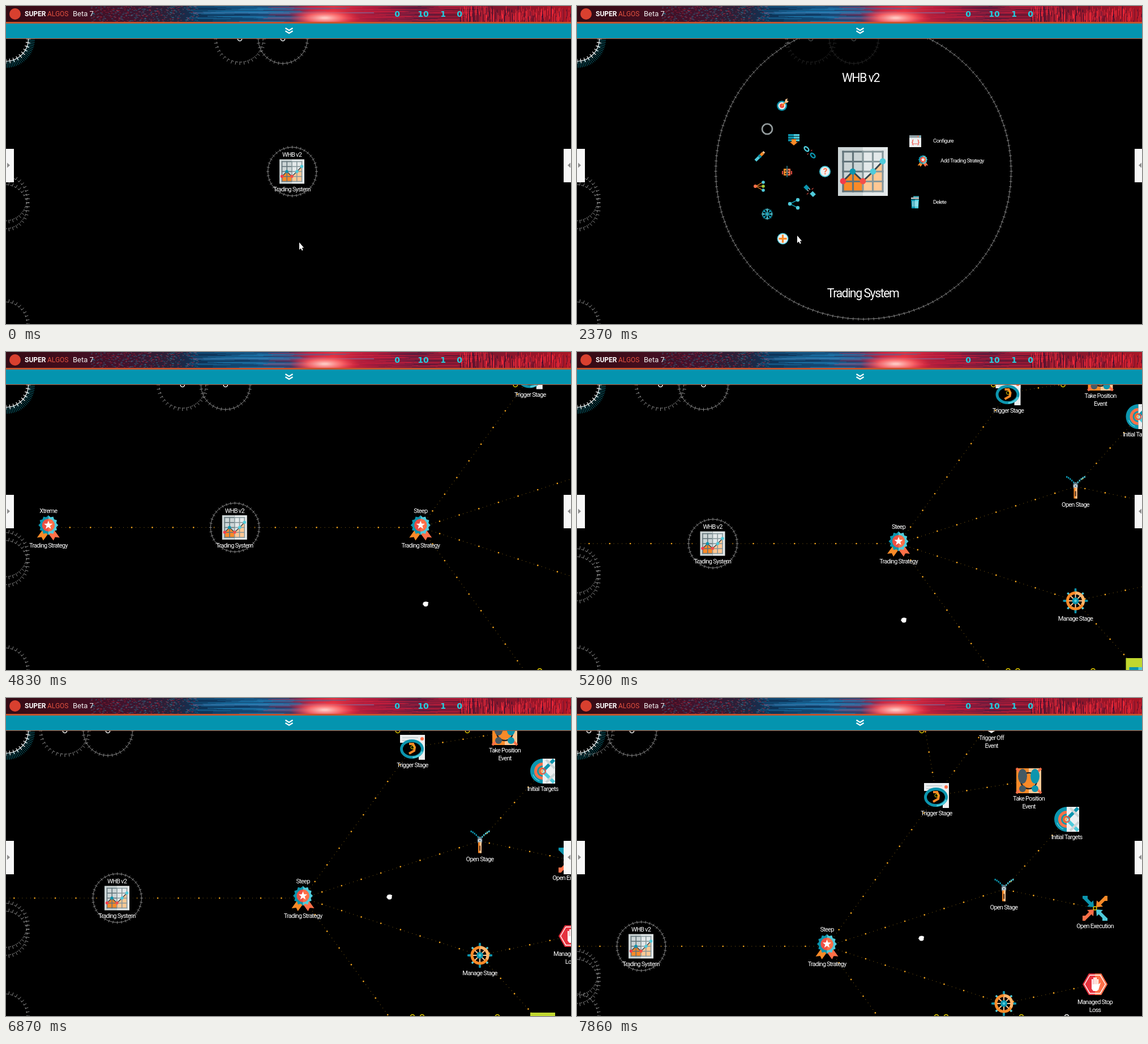
Animation, 998 px wide and 561 px high, one loop 7990 ms. Source, as an HTML page with a canvas:

```html
<!DOCTYPE html>
<html lang="en">
<head>
<meta charset="utf-8">
<title>Trading system map</title>
<style>
html, body { margin: 0; width: 100%; height: 100%; overflow: hidden; background: #000; }
canvas { display: block; width: 998px; height: 561px; }
</style>
</head>
<body>
<canvas id="stage" width="998" height="561"></canvas>
<script>
const W = 998, H = 561, TOP = 58, LOOP = 7990, TAU = Math.PI * 2;
const canvas = document.getElementById('stage');
let g = canvas.getContext('2d');

const TEAL = '#0c95ae', CYAN = '#4fcbdb', ORANGE = '#f98a28', RED = '#ef5044',
  CORAL = '#ff7048', PALE = '#eceff0', GREY = '#ccd5d6', SLATE = '#455a64', PEACH = '#ffc894';

// ---------- timing ----------
const steps = (a, b, n) => Array.from({ length: n }, (_, i) => Math.round(a + (b - a) * i / (n - 1)));
const ticks = [0, ...steps(580, 1590, 8), ...steps(1710, 2370, 6), 2520, 2670, ...steps(3080, 4020, 8),
  ...steps(4140, 5070, 8), ...steps(5200, 6200, 8), ...steps(6350, 7260, 8), ...steps(7410, 7860, 4)];
const hold = t => ticks.reduce((last, k) => k <= t ? k : last, 0);

function track(keys, t) {
  if (t <= keys[0][0]) return keys[0].slice(1);
  for (let i = 1; i < keys.length; i++) {
    const a = keys[i - 1], b = keys[i];
    if (t <= b[0]) {
      const k = (t - a[0]) / (b[0] - a[0]);
      return a.slice(1).map((v, j) => v + (b[j + 1] - v) * k);
    }
  }
  return keys[keys.length - 1].slice(1);
}
const PAN = [[4560, 0, 0], [5200, -265.5, 46], [5330, -304, 59], [6740, -304, 59],
  [6870, -309, 61], [7260, -370, 115], [7860, -392, 146]];
const POINTER = [[450, 518, 417], [1000, 508, 300], [1250, 525, 285], [1710, 640, 130], [2110, 520, 480],
  [2370, 389, 405], [2670, 364, 411], [3200, 364, 411], [4020, 769, 458], [4430, 842, 427],
  [4560, 842, 427], [5200, 577, 473], [5330, 539, 486], [5700, 539, 486], [6600, 682, 349],
  [6740, 682, 349], [6870, 677, 351], [7260, 617, 408], [7860, 608, 424]];
const OPEN = [[850, 0], [1450, 1], [4140, 1], [4560, 0]];
const SPREAD = [[2950, 0], [3560, 1]];

// ---------- drawing helpers ----------
function rect(x, y, w, h, c) { g.fillStyle = c; g.fillRect(x, y, w, h); }
function oval(x, y, rx, ry, c) { g.fillStyle = c; g.beginPath(); g.ellipse(x, y, rx, ry, 0, 0, TAU); g.fill(); }
function disc(x, y, r, c) { oval(x, y, r, r, c); }
function hoop(x, y, r, w, c, a = 0, b = TAU) {
  g.strokeStyle = c; g.lineWidth = w; g.beginPath(); g.arc(x, y, r, a, b); g.stroke();
}
function trace(p) {
  g.beginPath();
  for (let i = 0; i < p.length; i += 2) g.lineTo(p[i], p[i + 1]);
}
function poly(c, ...p) { trace(p); g.fillStyle = c; g.fill(); }
function line(c, w, ...p) { trace(p); g.strokeStyle = c; g.lineWidth = w; g.stroke(); }
function star(x, y, n, r1, r2, c) {
  const p = [];
  for (let i = 0; i < n * 2; i++) {
    const a = i * Math.PI / n - Math.PI / 2, r = i % 2 ? r2 : r1;
    p.push(x + r * Math.cos(a), y + r * Math.sin(a));
  }
  poly(c, ...p);
}
function at(x, y, k, fn) { g.save(); g.translate(x, y); g.scale(k, k); fn(); g.restore(); }
function half(side, fn) {
  g.save(); g.beginPath(); g.rect(side < 0 ? -60 : 0, -60, 60, 120); g.clip(); fn(); g.restore();
}

// Use the narrowest face at hand; the wider it is, the smaller and tighter it is set.
const FACES = [['normal', 'Roboto'], ['condensed', 'Roboto'], ['condensed', '"Open Sans"'], ['extra-condensed', '"Noto Sans"']];
const face = FACES.map(([stretch, family]) => {
  g.font = `${stretch} 100px ${family}, sans-serif`;
  return { stretch, family, em: g.measureText('Trading System').width / 100 };
}).reduce((a, b) => b.em < a.em ? b : a);
const sizeUp = Math.min(1.12, 1 + Math.max(0, 6.96 - face.em) * .07);
const gap = (5.95 / sizeUp - face.em) / 14;

function text(s, x, y, size, align = 'center', c = '#fff', weight = 400) {
  const px = size * sizeUp;
  g.font = `${weight} ${face.stretch} ${px}px ${face.family}, sans-serif`;
  g.letterSpacing = gap * px + 'px';
  g.textAlign = align;
  g.textBaseline = 'middle';
  g.fillStyle = c;
  g.fillText(s, x, y);
}
function teeth(x, y, r, n, reach, c, w = 1) {
  g.strokeStyle = c; g.lineWidth = w; g.beginPath();
  for (let i = 0; i < n; i++) {
    const a = i / n * TAU, u = Math.cos(a), v = Math.sin(a);
    g.moveTo(x + u * (r - reach), y + v * (r - reach));
    g.lineTo(x + u * (r + reach), y + v * (r + reach));
  }
  g.stroke();
}
function gear(x, y, r, n, reach, c, w = 1) {
  hoop(x, y, r, w, c);
  teeth(x, y, r, n, reach, c, w);
}
// Loose ring: each tooth carries only a short piece of the rim.
function loose(x, y, r, n, c) {
  const arc = TAU * r / n;
  g.setLineDash([arc * .45, arc * .55]);
  hoop(x, y, r - 2, 1, c);
  g.setLineDash([]);
  teeth(x, y, r, n, 3, c);
}
function spokes(n, r1, r2, w, c) {
  for (let i = 0; i < n; i++) {
    const a = i / n * TAU, u = Math.cos(a), v = Math.sin(a);
    line(c, w, u * r1, v * r1, u * r2, v * r2);
  }
}

// ---------- node icons, about 44 units wide ----------
function chart() {
  rect(-22, -21.5, 22, 43, GREY); rect(0, -21.5, 22, 43, '#e4e9ea');
  poly(ORANGE, -17.5, 8.5, -9, 0, 0, 8.5, 0, 17.5, -17.5, 17.5);
  poly(PEACH, 0, 8.5, 9, 0, 17.5, -9, 17.5, 17.5, 0, 17.5);
  for (let i = -2; i <= 2; i++) {
    const p = i * 8.75;
    line(i < 0 ? '#62747a' : '#87989c', 1.6, p, -18.3, p, 18.3);
    line('#62747a', 1.6, -18.3, p, 0, p);
    line('#87989c', 1.6, 0, p, 18.3, p);
  }
  line('#37474f', 1.5, -17.5, 8.5, -9, 0, 0, 8.5, 9, 0, 17.5, -9);
  [[-17.5, 8.5, '#f23c4a'], [-9, 0, TEAL], [0, 8.5, '#f4504a'], [9, 0, CYAN], [17.5, -9, CYAN]]
    .forEach(p => disc(p[0], p[1], 2.7, p[2]));
}
function medal() {
  poly(ORANGE, -10, 4, -20, 18, -12, 17, -9, 23, 2, 8);
  poly(CORAL, 10, 4, 20, 18, 12, 17, 9, 23, -2, 8);
  half(-1, () => star(0, -4, 12, 17.5, 14.5, TEAL));
  half(1, () => star(0, -4, 12, 17.5, 14.5, CYAN));
  disc(0, -4, 11, RED);
  half(1, () => disc(0, -4, 11, CORAL));
  star(0, -4, 5, 8, 3.3, '#fff');
}
function trigger() {
  rect(-22, -22, 44, 14, PALE); rect(11, -22, 11, 44, PALE);
  rect(-18, -18, 28, 2, GREY); rect(-18, -13, 20, 2, GREY);
  disc(17, -15, 3, CORAL);
  oval(-1, 3, 21, 17, TEAL); oval(-1, 3, 16, 12, '#000');
  half(1, () => { g.lineWidth = 3; g.strokeStyle = CYAN; g.beginPath(); g.ellipse(-1, 3, 19, 15, 0, .3, 1.5); g.stroke(); });
  line(ORANGE, 4, -6, -6, 1, -6, 4, 0, 3, 6, -6, 11);
  hoop(0, 0, 3, 1, '#e8d000');
}
function feet() {
  rect(-22, -22, 22, 44, ORANGE); rect(0, -22, 22, 44, PEACH);
  line(CORAL, 4, -22, -22, 22, 22); line(CORAL, 4, -22, 22, 22, -22);
  hoop(0, 0, 14, 2.5, '#222');
  disc(0, 0, 12, ORANGE);
  oval(-11, -8, 8, 13, SLATE); oval(-11, 14, 6, 6, SLATE);
  oval(11, -8, 8, 13, TEAL); oval(11, 14, 6, 6, TEAL);
}
function targets() {
  half(-1, () => {
    disc(0, 0, 22, TEAL); hoop(0, 0, 18, 1.5, CYAN, 1.9, 2.8);
    disc(0, 0, 15, CORAL); disc(0, 0, 10, TEAL); disc(0, 0, 7, ORANGE);
  });
  rect(0, -22, 22, 44, PALE);
  line(TEAL, 6, 1, -1, 20, -20); line(CYAN, 6, 1, 1, 20, 20);
  line(GREY, 4, 6, -20, 21, -5); line(GREY, 4, 6, 20, 21, 5);
  hoop(0, 0, 5, 2, RED); hoop(0, 0, 2.5, 1, '#ffe0c0');
}
function zip() {
  for (let i = 0; i < 5; i++) {
    const x = 3 + i * 3, y = -9 - 3.4 * i + .25 * i * i;
    rect(-x - 1.5, y, 2.4, 3, TEAL); rect(x, y, 2.4, 3, CYAN);
  }
  oval(0, -1, 4.5, 7, '#607d8b'); hoop(0, -1, 2.4, 1.4, PALE);
  rect(-3, 2, 6, 19, ORANGE); rect(0, 2, 3, 19, PEACH);
  rect(-1.2, 8, 2.4, 9, '#5b3a20');
}
function arrows() {
  [TEAL, ORANGE, CYAN, CORAL].forEach((c, i) => {
    g.save(); g.rotate(i * Math.PI / 2);
    line(c, 6, -20, -20, -7, -7);
    poly(c, -2, -2, -14, -3, -3, -14);
    rect(-22, -22, 9, 5, c);
    g.restore();
  });
  hoop(0, 0, 3, 1.4, '#e8d000');
}
function stop() {
  const hex = [-11, -19, 11, -19, 22, 0, 11, 19, -11, 19, -22, 0];
  poly('#e6323e', ...hex);
  half(1, () => poly(CORAL, ...hex));
  line('#fff', 1.4, ...hex.map(v => v * .84), -9.2, -16);
  for (let i = 0; i < 4; i++) rect(-6 + i * 3.2, i % 3 ? -12 : -9, 2.5, 14, '#fff');
  poly('#fff', -6, 0, 6.2, 0, 10, -3, 6, 10, 3, 12, -3, 12, -6, 8);
}
function wheel() {
  spokes(8, 14, 20, 3.4, CYAN); spokes(4, 14, 22, 3.4, TEAL);
  hoop(0, 0, 14, 5, ORANGE); hoop(0, 0, 14, 5, '#ffb46a', -1.57, .5);
  spokes(8, 4, 12, 2, PEACH);
  disc(0, 0, 6, TEAL); disc(0, 0, 2.4, CYAN);
}
function profit() {
  rect(-22, -22, 44, 44, '#c0d72f');
  rect(-16, -6, 32, 18, TEAL); rect(0, -6, 16, 18, CYAN);
}
function shield() { poly(PALE, -14, -10, 14, -10, 8, 18, 0, 23, -8, 18); }

// ---------- map ----------
const ROOT = { x: 505, y: 292 };
const node = (x, y, parent, icon, type, name, dot = '#e8d000') => ({ x, y, parent, icon, type, name, dot });
const xtreme = node(176, 292, ROOT, medal, ['Trading Strategy'], 'Xtreme');
const steep = node(833.5, 292, ROOT, medal, ['Trading Strategy'], 'Steep');
const trig = node(1027, 26, steep, trigger, ['Trigger Stage']);
const open = node(1146, 191.5, steep, zip, ['Open Stage']);
const manage = node(1146, 393, steep, wheel, ['Manage Stage']);
const close = node(1027, 558, steep, null, []);
const NODES = [xtreme, steep, trig, open, manage, close,
  node(1001, -124, trig, null, []),
  node(1124, -107, trig, shield, ['Trigger Off', 'Event']),
  node(1190, 0, trig, feet, ['Take Position', 'Event']),
  node(1257, 68, open, targets, ['Initial Targets']),
  node(1307, 225, open, arrows, ['Open Execution']),
  node(1307, 359, manage, stop, ['Managed Stop', 'Loss']),
  node(1257, 516, manage, profit, ['Managed', 'Take Profit'], null, '#fff'),
  node(1044, 640, null, null, []),
  node(1177, 660, null, null, [])];

function dots(a, b) {
  const dx = a.x - b.x, dy = a.y - b.y, len = Math.hypot(dx, dy);
  for (let i = 1; i * 7.28 < len - 3; i++) {
    const k = (1.7 + i * 7.28) / len, x = b.x + dx * k, y = b.y + dy * k;
    if (i % 5) rect(x - .5, y - .5, 1, 1, '#8a6414');
    else disc(x, y, 1.35, '#f0a31c');
  }
}
function drawNode(n, p) {
  if (p.x < -22 || p.x > W + 22) return;
  const off = p.y < TOP - 22 || p.y > H + 22;
  if (off) return hoop(p.x, p.y < H / 2 ? TOP : H + 1, 3.6, 1.5, n.dot);
  if (!n.icon) return;
  at(p.x, p.y, 1, n.icon);
  if (n.name) text(n.name, p.x, p.y - 29, 11);
  n.type.forEach((s, i) => text(s, p.x, p.y + 32 + i * 14, 11));
}

function farRings(ox, oy) {
  teeth(0, TOP, 45, 100, 6, '#0d7a8b', .9);
  gear(0, TOP, 39.5, 36, 4, '#fff', 1.2);
  loose(413 + ox, TOP, 43, 36, '#8a8a8a');
  gear(489 + ox, TOP, 43.5, 36, 3, '#858585');
  hoop(413 + ox, TOP, 3.6, 1.5, '#fff');
  hoop(489 + ox, TOP, 3.6, 1.5, '#fff');
  const y = Math.min(345 + oy, H);
  loose(-2, y - 5, 41, 36, '#8a8a8a');
  loose(-2, y + 9, 41, 36, '#8a8a8a');
  loose(-2, H, 41, 36, '#8a8a8a');
}

// ---------- menu icons, about 20 units wide ----------
const menu = [
  [363, 174, () => {
    disc(-1, 2, 9, TEAL); disc(-1, 2, 6.5, PALE); disc(-1, 2, 4, RED);
    line(ORANGE, 2.4, -1, 2, 6, -5); poly(PEACH, 4, -4, 5, -9, 9, -11, 8, -7, 11, -6, 8, -3);
  }],
  [336, 217, () => { hoop(0, 0, 9, 2.6, '#c4d0d2'); teeth(0, 0, 9, 28, 1.3, '#333', .7); }],
  [383, 236, () => {
    for (let i = 0; i < 3; i++) { rect(-10, -10 + i * 4.5, 10, 3.6, TEAL); rect(0, -10 + i * 4.5, 10, 3.6, CYAN); }
    poly(ORANGE, -4, -1, 4, -1, 4, 4, 7, 4, 0, 10, -7, 4, -4, 4);
  }],
  [411, 258, () => {
    g.rotate(.8);
    for (const x of [-8, 8]) { oval(x, 0, 6, 4, x < 0 ? CYAN : TEAL); oval(x, 0, 3.4, 1.7, '#000'); }
    line(RED, 1, 0, -6, 0, -3); line(RED, 1, 0, 3, 0, 6);
  }],
  [323, 265, () => {
    g.rotate(-.78);
    rect(-11, -2.5, 9, 5, CYAN); rect(-2, -3, 4, 6, TEAL); rect(2, -2.5, 6, 5, ORANGE); rect(8, -2, 3, 4, PEACH);
  }],
  [371, 292, () => {
    rect(-6, -5, 5, 12, ORANGE); rect(1, -5, 5, 12, CORAL);
    rect(-9, -1, 2, 6, RED); rect(7, -1, 2, 6, RED);
    rect(-4, -2, 2, 2, '#222'); rect(2, -2, 2, 2, '#222'); rect(-4, 3, 8, 1.5, '#222');
    line(CYAN, 1, 0, -10, 0, 10);
  }],
  [438, 292, () => {
    disc(0, 0, 10, CYAN); disc(0, 0, 8, PALE); text('?', 0, .5, 15, 'center', CORAL, 700);
  }],
  [322, 318, () => {
    for (const y of [-7, 0, 7]) { line(ORANGE, 1.2, -6, 0, 6, y); disc(7, y, 2.8, y ? CYAN : '#9ccc3c'); }
    disc(-7, 0, 3, CORAL);
  }],
  [411, 326, () => {
    g.rotate(.8);
    rect(-12, -3.5, 8, 7, TEAL); rect(4, -3.5, 8, 7, CYAN);
    line(PALE, 1.2, -4, -2, -1, -2); line(PALE, 1.2, -4, 2, -1, 2);
    line(RED, 1, 1, -8, 1, -4); line(RED, 1, 1, 4, 1, 8);
  }],
  [383, 349, () => {
    line(TEAL, 1.6, 7, -7, -7, 0, 7, 7);
    disc(-7, 0, 3.2, CYAN); disc(7, -7, 3.2, CYAN); disc(7, 7, 3.2, CYAN);
  }],
  [336, 367, () => {
    for (let i = 0; i < 8; i++) {
      const c = i % 2 ? TEAL : CYAN;
      line(c, 1.6, 0, 0, 10, 0); line(c, 1.3, 9, -3, 6, 0, 9, 3);
      g.rotate(TAU / 8);
    }
  }]
];
const actions = [
  [597.5, 238.5, 'Configure', 629, () => {
    rect(-10.5, -10.5, 21, 21, PALE); rect(-10.5, -10.5, 21, 4.5, '#8fa0a6');
    disc(5, -8.3, 1.2, CORAL); disc(8, -8.3, 1.2, CYAN);
    text('{...}', 0, 2, 11, 'center', RED, 700);
  }],
  [611, 273, 'Add Trading Strategy', 642, () => { g.scale(.47, .47); medal(); }],
  [597, 346, 'Delete', 629, () => {
    rect(-7, -8, 14, 2, PALE); rect(-3, -10.5, 10, 2, CYAN);
    poly(TEAL, -7, -5, 0, -5, 0, 11, -6, 11); poly(CYAN, 0, -5, 7, -5, 6, 11, 0, 11);
    for (const x of [-3.5, 0, 3.5]) rect(x - .6, -2, 1.2, 10, '#fff');
  }]
];
function plusMinus(minus) {
  disc(0, 0, 10, CYAN); disc(0, 0, 8.6, PALE);
  rect(-7, -1.6, 14, 3.2, ORANGE);
  if (!minus) rect(-1.6, -7, 3.2, 14, ORANGE);
}

function drawRoot(x, y, e, t) {
  const r = 43 + 218 * e, cx = x + .5 + .5 * e, cy = y - .5 * e;
  disc(cx, cy, r, `rgba(0,0,0,${.55 + .18 * e})`);
  gear(cx, cy, r, Math.round(36 + 144 * e), 2.5, '#868686');
  at(x, y, 1 + e, chart);
  text('WHB v2', x - 4 * e, y - 29 - 135 * e, 11 + 10.3 * e);
  text('Trading System', x, y + 32 + 184 * e, 11 + 10.3 * e);
  if (e < .05) return;
  g.save();
  g.globalAlpha = e;
  const place = (px, py, fn, k = 1) => at(x + (px - 505) * e, y + (py - 292) * e, e * k, fn);
  menu.forEach(m => place(m[0], m[1], m[2]));
  place(363.5, 410.5, () => plusMinus(t >= 3080), t >= 2520 && t < 3350 ? 1.4 : 1);
  actions.forEach(([px, py, label, tx, fn]) => {
    place(px, py, fn);
    if (e > .6) text(label, x + (tx - 505) * e, y + (py - 292) * e, 9.7, 'left');
  });
  g.restore();
}

// ---------- header ----------
function seeded(seed) {
  return () => (seed = (seed * 16807) % 2147483647) / 2147483647;
}
function makeHeader() {
  const c = document.createElement('canvas');
  c.width = W; c.height = TOP;
  const main = g, rnd = seeded(77);
  g = c.getContext('2d');
  const bg = g.createLinearGradient(0, 0, W, 0);
  [[0, '#330a14'], [.1, '#420d1c'], [.2, '#42122c'], [.29, '#2a2038'], [.34, '#0d3458'], [.44, '#103c66'],
    [.5, '#40305c'], [.54, '#c41f3c'], [.58, '#e0303f'], [.64, '#a81c3c'], [.72, '#641a3c'], [.82, '#76162e'], [1, '#a81626']]
    .forEach(s => bg.addColorStop(s[0], s[1]));
  rect(0, 0, W, 28, bg);
  for (let i = 0; i < 420; i++) {
    const x = 150 + rnd() * 190;
    rect(x, rnd() * 28, 1 + rnd() * 3, 1, rnd() < .5 ? 'rgba(40,160,190,.5)' : 'rgba(210,40,60,.55)');
  }
  for (let i = 0; i < 60; i++) {
    const x = 320 + rnd() * 150, red = x > 450;
    rect(x, Math.floor(rnd() * 28), 50 + rnd() * 130, 1, red ? 'rgba(225,50,85,.4)' : 'rgba(30,130,185,.4)');
  }
  for (let i = 0; i < 60; i++) rect(600 + rnd() * 170, Math.floor(rnd() * 28), 30 + rnd() * 70, 1, 'rgba(215,30,60,.4)');
  rect(330, 11, 320, 2, 'rgba(90,150,210,.4)');
  g.save();
  g.translate(563, 21); g.scale(1, .26);
  const glow = g.createRadialGradient(0, 0, 4, 0, 0, 62);
  glow.addColorStop(0, '#ffc6c0'); glow.addColorStop(.45, 'rgba(255,110,110,.85)'); glow.addColorStop(1, 'rgba(240,40,60,0)');
  disc(0, 0, 62, glow);
  g.restore();
  for (let i = 0; i < 210; i++) {
    const x = 800 + rnd() * 198, y = rnd() * 20;
    rect(Math.floor(x), y, 1, 4 + rnd() * 20, rnd() < .75 ? 'rgba(250,45,60,.75)' : 'rgba(40,16,50,.8)');
  }
  g.textAlign = 'center'; g.textBaseline = 'middle'; g.fillStyle = '#20cfe0';
  g.font = 'bold 14px "DejaVu Sans", sans-serif';
  [['0', 691], ['10', 737], ['1', 772], ['0', 801]].forEach(([s, x]) => g.fillText(s, x, 15));
  disc(16, 14, 10, '#d8402f');
  g.textAlign = 'left';
  const word = (s, x, font, col) => { g.font = font; g.fillStyle = col; g.fillText(s, x, 14); };
  word('SUPER', 33, '700 12px Roboto, sans-serif', '#fff');
  word('ALGOS', 73, '400 12px Roboto, sans-serif', '#e0503f');
  word('Beta 7', 118, '400 13px Roboto, sans-serif', '#f2f2f2');
  rect(0, 28, W, 3, '#c4552f');
  rect(0, 31, W, 26, '#0494af');
  rect(0, 57, W, 1, '#c4552f');
  for (const y of [39, 44]) line('#fff', 2.2, 493.5, y, 500, y + 4, 506.5, y);
  g = main;
  return c;
}
const header = makeHeader();

function sideTabs() {
  rect(0, 252, 14, 59, '#f7f7f7');
  poly('#8c8c8c', 2, 276.5, 7, 281, 2, 285.5);
  rect(985, 252, 13, 59, '#f7f7f7');
  poly('#8c8c8c', 997, 276.5, 992, 281, 997, 285.5);
}
function pointer(x, y, grab) {
  if (!grab) return poly('#fff', x, y, x, y + 13, x + 2.8, y + 10.4, x + 4.8, y + 14.6, x + 6.6, y + 13.8, x + 4.8, y + 9.6, x + 8.2, y + 9.4);
  for (let i = 0; i < 4; i++) disc(x - 2.2 + i * 1.9, y - 2.2 + (i % 3 ? -.6 : 0), 1.6, '#fff');
  oval(x + .4, y + .8, 4.2, 3.6, '#fff');
  disc(x - 3.4, y, 1.5, '#fff');
}

// ---------- frame ----------
function draw(t) {
  const [ox, oy] = track(PAN, t), [e] = track(OPEN, t), [mx, my] = track(POINTER, t);
  const lin = track(SPREAD, t)[0], s = 1 - (1 - lin) ** 2;
  const pos = n => ({ x: ROOT.x + (n.x - ROOT.x) * s + ox, y: ROOT.y + (n.y - ROOT.y) * s + oy });
  rect(0, 0, W, H, '#000');
  farRings(ox, oy);
  if (t >= 3080) {
    NODES.forEach(n => n.parent && dots(pos(n.parent), pos(n)));
    NODES.forEach(n => drawNode(n, pos(n)));
  }
  drawRoot(ROOT.x + ox, ROOT.y + oy, e, t);
  g.drawImage(header, 0, 0);
  sideTabs();
  pointer(mx, my, t >= 4500 && t < 5400 || t >= 6700);
}
const start = performance.now();
function loop() {
  draw(hold((performance.now() - start) % LOOP));
  requestAnimationFrame(loop);
}
loop();
</script>
</body>
</html>
```
